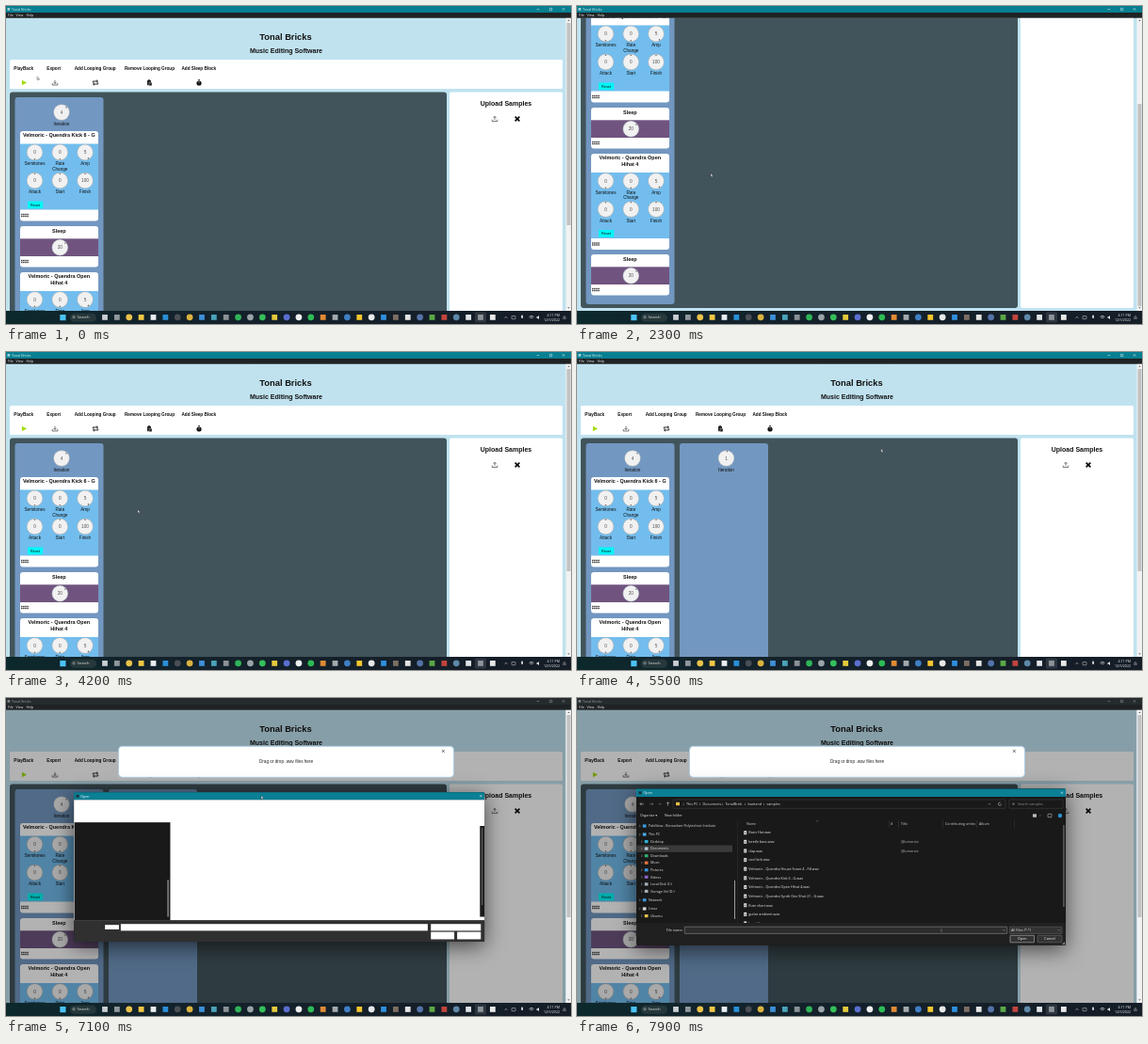
An HTML page with a canvas for the animation above (8 s loop, 600x338 px).

```html
<!DOCTYPE html>
<html lang="en">
<head>
<meta charset="utf-8">
<title>Tonal Bricks</title>
<style>
html, body { margin: 0; width: 100%; height: 100%; overflow: hidden; background: #121b24; }
canvas { display: block; width: 100vw; height: 100vh; }
</style>
</head>
<body>
<canvas id="stage" width="600" height="338"></canvas>
<script>
const c = document.getElementById('stage').getContext('2d');
const LOOP = 8000;
const SANS = '"Liberation Sans", Arial, sans-serif';
const UI = '"Open Sans", "Noto Sans", sans-serif';
const BASE = 4.67, H3 = 5.46, H2 = 7, H1 = 9.33;
const PAGE_END = 447;

const CURSOR = [
  [0, 33, 75], [250, 22, 86], [800, 60, 150], [1300, 62, 245], [1850, 142, 178],
  [2950, 142, 178], [3100, 145, 178], [3900, 145, 178], [4200, 140, 168],
  [4800, 95, 82], [5150, 95, 82], [5800, 517, 121], [6000, 518, 122],
  [6150, 518, 122], [6300, 448, 122], [6650, 300, 70], [6950, 285, 80],
  [7100, 271, 104], [7300, 271, 104], [7700, 387, 247]
];
const SCROLL = [[1900, 0], [2230, 126], [3400, 126], [3600, 103], [4050, 0]];
const GROUP_AT = 5100, MODAL_AT = 6200, DIALOG_AT = 7000, LOADED_AT = 7300;

function track(keys, t, i = 1) {
  if (t <= keys[0][0]) return keys[0][i];
  for (let k = 1; k < keys.length; k++) {
    const a = keys[k - 1], b = keys[k];
    if (t <= b[0]) return a[i] + (b[i] - a[i]) * (t - a[0]) / (b[0] - a[0]);
  }
  return keys[keys.length - 1][i];
}

function rect(x, y, x2, y2, fill) {
  c.fillStyle = fill;
  c.fillRect(x, y, x2 - x, y2 - y);
}

function round(x, y, x2, y2, r, fill, stroke, w = 0.5) {
  c.beginPath();
  c.roundRect(x, y, x2 - x, y2 - y, r);
  if (fill) { c.fillStyle = fill; c.fill(); }
  if (stroke) { c.strokeStyle = stroke; c.lineWidth = w; c.stroke(); }
}

function disc(x, y, r, fill) {
  c.beginPath();
  c.arc(x, y, r, 0, 7);
  c.fillStyle = fill;
  c.fill();
}

// y is the vertical middle of the line
function text(s, x, y, { size = BASE, bold = false, color = '#111', align = 'center', font = SANS } = {}) {
  c.font = `${bold ? 'bold ' : ''}${size}px ${font}`;
  c.textAlign = align;
  c.textBaseline = 'alphabetic';
  c.fillStyle = color;
  c.fillText(s, x, y + size * 0.35);
}

const label = (s, x, y, size = 3.7, color = '#e4e4e4', align = 'left') =>
  text(s, x, y, { size, color, align, font: UI });

function path(d, x, y, { stroke, fill, w = 0.7, scale = 1 }) {
  const p = new Path2D(d);
  c.save();
  c.translate(x, y);
  c.scale(scale, scale);
  if (fill) { c.fillStyle = fill; c.fill(p); }
  if (stroke) { c.strokeStyle = stroke; c.lineWidth = w; c.stroke(p); }
  c.restore();
}

const CROSS = 'M-1 -1L1 1M1 -1L-1 1';
const cross = (x, y, r, color, w) => path(CROSS, x, y, { stroke: color, w: w / r, scale: r });
const chevron = (x, y, color = '#aaa') => path('M-.6 -1.1L.6 0L-.6 1.1', x, y, { stroke: color, w: 0.5 });

function knob(x, y, value, turn) {
  disc(x, y, 8.7, '#a9b4bb');
  disc(x, y, 8.1, '#f1f1f1');
  const a = turn * Math.PI * 2;
  disc(x + Math.sin(a) * 7.3, y - Math.cos(a) * 7.3, 0.8, '#6b6b6b');
  text(value, x, y, { color: '#4d4d4d' });
}

function handle(y) {
  for (let i = 0; i < 4; i++)
    for (let j = -1; j < 2; j += 2) rect(16 + i * 2.1, y + j - 0.7, 17.5 + i * 2.1, y + j + 0.7, '#3a3a3a');
}

function sampleCard(top, lines) {
  const b = top + 7 + lines.length * 6.5;
  round(15, top, 98, b + 82, 3, '#fff');
  lines.forEach((s, i) => text(s, 56.3, top + 4.3 + i * 6.6, { size: H3, bold: true }));
  rect(15, b, 98, b + 70, '#72bdee');
  [['Semitones', 30.5, 0, .5], ['Rate', 57.3, 0, .5], ['Amp', 84, 5, .42]].forEach(([s, x, v, a]) => {
    knob(x, b + 9, v, a);
    text(s, x, b + 21.3);
  });
  text('Change', 57.3, b + 26.7);
  [['Attack', 30.5, 0], ['Start', 57.3, 0], ['Finish', 84, 100]].forEach(([s, x, v]) => {
    knob(x, b + 39, v, 0);
    text(s, x, b + 51.3);
  });
  round(23, b + 61, 39.2, b + 68.8, 0.8, '#00f7f7');
  text('Reset', 31, b + 65, { size: 3.9 });
  handle(b + 76);
}

function sleepCard(top) {
  round(15, top, 98, top + 43.5, 3, '#fff');
  text('Sleep', 56.3, top + 4.6, { size: H3, bold: true });
  rect(15, top + 13.3, 98, top + 32, '#70547f');
  knob(57.3, top + 22.7, 20, 0.14);
  handle(top + 37.5);
}

function group(x, count, turn) {
  round(x, 97, x + 94, 443, 3, '#7297c1');
  knob(x + 49.5, 113, count, turn);
  text('Iteration', x + 49.5, 125);
}

function toolIcons(y) {
  path('M-2.4 -2.8L2.8 0L-2.4 2.8Z', 19.3, y, { fill: '#a3dc12' });
  path('M-2.8 .6V2.5H2.8V.6M0 -2.8V1M-1.5 -.5L0 1L1.5 -.5', 52, y, { stroke: '#222', w: 0.6 });
  path('M-2.7 0V-1.5H2M1 -2.8L2.6 -1.5L1 -.2M2.7 0V1.5H-2M-1 .2L-2.6 1.5L-1 2.8', 95, y, { stroke: '#111', w: 0.9 });
  round(150, y - 2.5, 154, y + 2.7, 0.5, '#222');
  rect(151, y - 3.2, 153, y - 2, '#222');
  round(152, y - 0.2, 155, y + 3.2, 0.4, '#222', '#fff', 0.4);
  disc(205, y + 0.5, 2.6, '#111');
  rect(204, y - 3.2, 206, y - 2.4, '#111');
  path('M0 -1.2V.7', 205, y, { stroke: '#fff', w: 0.5 });
}

function page(scroll, t) {
  c.save();
  c.beginPath();
  c.rect(0, 12.5, 600, 311.5);
  c.clip();
  rect(0, 12, 600, 324, '#c0e2ef');
  c.translate(0, -scroll);

  text('Tonal Bricks', 297, 33, { size: H1, bold: true });
  text('Music Editing Software', 297.5, 47.5, { size: H2, bold: true });
  round(4, 57, 591, 88, 1.5, '#fff');
  [['PlayBack', 18.7], ['Export', 50.7], ['Add Looping Group', 94.7],
   ['Remove Looping Group', 152.5], ['Add Sleep Block', 204.8]]
    .forEach(([s, x]) => text(s, x, 66.3, { bold: true }));
  toolIcons(81.5);

  round(4, 91.5, 468, PAGE_END, 3, '#42545b');
  group(9.5, 4, 0.12);
  sampleCard(133, ['Velmoric - Quendra Kick 6 - G']);
  sleepCard(234);
  sampleCard(283, ['Velmoric - Quendra Open', 'Hihat 4']);
  sleepCard(390);
  if (t >= GROUP_AT) group(109, 1, 0.02);

  round(471, 91.5, 591, PAGE_END, 2, '#fff');
  text('Upload Samples', 531, 104, { size: H2, bold: true });
  path('M-2.8 .6V2.5H2.8V.6M0 1V-2.7M-1.5 -1.2L0 -2.7L1.5 -1.2', 519, 120, { stroke: '#222', w: 0.6 });
  cross(543, 120, 2.4, '#000', 1.5);
  c.restore();

  if (t >= MODAL_AT) modal();
  scrollbar(scroll);
}

function modal() {
  rect(0, 12.5, 594.5, 324, 'rgba(0,0,0,.3)');
  round(119.5, 51.3, 475.5, 84.3, 4, '#fff', '#a9cbe6', 0.9);
  text('Drag or drop .wav files here', 297.5, 67.8, { color: '#222' });
  cross(464.3, 56.5, 1.3, '#222', 0.7);
}

function scrollbar(scroll) {
  rect(594.5, 12.5, 600, 324, '#f2f2f2');
  const y = 18 + scroll * 0.683;
  rect(595.5, y, 599.5, y + 215, '#c2c2c2');
  path('M-1.2 .7L0 -.7L1.2 .7Z', 597.5, 15.3, { fill: '#666' });
  path('M-1.2 -.7L0 .7L1.2 -.7Z', 597.5, 321, { fill: '#666' });
}

function titleBar(active) {
  rect(0, 0, 600, 7, active ? '#087f92' : '#262b2e');
  rect(0, 7, 600, 12.6, '#1f2224');
  const ink = active ? '#e8f4f6' : '#9a9fa2';
  rect(1.5, 2, 4.2, 4.8, active ? '#9fd0d8' : '#7d8487');
  label('Tonal Bricks', 6, 3.5, 3.7, ink);
  [['File', 2], ['View', 10.5], ['Help', 21.5]].forEach(([s, x]) => label(s, x, 9.8, 3.6, '#f0f0f0'));
  path('M-1.3 0H1.3', 565, 3.5, { stroke: ink, w: 0.5 });
  round(577.5, 2.3, 579.8, 4.6, 0, null, ink);
  cross(592, 3.4, 1.2, ink, 0.5);
}

// a leading "o" makes the icon round
const APPS = ('c9ced2 8f979c oe9c24a f2c744 e9eef2 2a8fd8 o4a4f55 od9b23f 3d8fd6 4aa3b8 8a9196 o2fb457 ' +
  'o9aa3a8 o35c05a e5c93c o5a6fd0 oeef0f0 o2dbb55 e08a34 a3a9ad o3f7fc4 f3c62f oe8e8e8 2f8fdc ' +
  '7d6d62 e4e4e4 o5573a8 5aa845 c2453d o5e88a8 dfe3e6 8d9499 e9e9e9').split(' ');

function taskbar() {
  const g = c.createLinearGradient(0, 0, 600, 0);
  g.addColorStop(0, '#0c292c');
  g.addColorStop(0.25, '#13222b');
  g.addColorStop(1, '#151d27');
  c.fillStyle = g;
  c.fillRect(0, 324, 600, 14);
  rect(57.3, 328, 63.5, 334.2, '#4cc2f5');
  round(68, 326.7, 96, 335.7, 4.5, '#26383b');
  c.beginPath();
  c.arc(72, 330.7, 1.2, 0, 7);
  c.strokeStyle = '#ddd';
  c.lineWidth = 0.5;
  c.stroke();
  label('Search', 75.5, 331, 4.2);
  round(498, 325.5, 510, 336.5, 1.5, '#2e3740');
  APPS.forEach((a, i) => {
    const x = 105 + i * 12.87, round = a[0] === 'o', color = '#' + a.slice(-6);
    if (round) disc(x, 330.8, 3.4, color);
    else rect(x - 2.9, 328, x + 2.9, 333.8, color);
  });
  path('M-1.4 .7L0 -.7L1.4 .7', 531, 331, { stroke: '#ddd', w: 0.6 });
  round(537, 329.5, 541, 332.7, 0.4, null, '#ddd');
  round(547.2, 328.5, 549, 332, 0.8, '#ddd');
  path('M-2.4 -.6Q0 -2.7 2.4 -.6M-1.3 .7Q0 -.5 1.3 .7', 558, 331, { stroke: '#eee', w: 0.7 });
  path('M-1.5 -.8H-.4L1 -2V2L-.4 .8H-1.5Z', 565, 331, { fill: '#eee' });
  label('4:11 PM', 588, 328.8, 3.6, '#eee', 'right');
  label('12/5/2022', 588, 334, 3.6, '#eee', 'right');
  path('M-1.5 1.2H1.5L1 .4V-.6Q0 -2.4 -1 -.6V.4Z', 593, 331, { stroke: '#ddd', w: 0.5 });
}

const PLACES = [
  ['PaleStow - Rensselaer Polytechnic Institute', 136, 0, '#3c9be0'], ['This PC', 145, 0, '#48a9e6'],
  ['Desktop', 152.6, 1, '#2fb0d8'], ['Documents', 160.1, 1, '#b9c6d0'], ['Downloads', 167.7, 1, '#35b06e'],
  ['Music', 175.2, 1, '#e2763e'], ['Pictures', 182.8, 1, '#3f94dd'], ['Videos', 190.3, 1, '#8b62c9'],
  ['Local Disk (C:)', 197.9, 1, '#a7b0b6'], ['Storage Vol (D:)', 205.4, 1, '#a7b0b6'],
  ['Network', 214.7, 0, '#3f94dd'], ['Linux', 224, 0, '#d8d8d8'], ['Ubuntu', 231.6, 1, '#e5bd4a']
];
const PACK = 'Velmoric - Quendra ';
const FILES = ['Basic Hat', 'beetle bass', 'clap', 'cool kick', PACK + 'House Snare 4 - F#', PACK + 'Kick 6 - G',
  PACK + 'Open Hihat 4', PACK + 'Synth One Shot 21 - G', 'flute short', 'guitar ambient', 'hey title'];

function dialogFrame() {
  c.save();
  c.shadowColor = 'rgba(0,0,0,.6)';
  c.shadowBlur = 22;
  c.shadowOffsetY = 5;
  round(63, 96.3, 519, 262.7, 1.5, '#191919');
  c.restore();
  rect(63, 96.5, 519, 105, '#0b7f94');
  rect(65.5, 99.3, 68.5, 102.3, '#1d3238');
  label('Open', 70.5, 100.8, 3.7, '#fff');
  cross(515, 100.7, 1.1, '#fff', 0.5);
}

function dialogBlank() {
  rect(63, 105, 519, 239, '#fff');
  rect(63.5, 130, 170, 239, '#191919');
  rect(514, 134, 519, 235, '#191919');
  rect(516.2, 136, 517, 222, '#8b8b8b');
  rect(167, 194, 168, 235, '#c8c8c8');
  rect(63, 239, 519, 262.7, '#303030');
  [[97.5, 244, 113, 249], [115, 243, 456, 250.5], [459.5, 243, 515, 250.5],
   [459.5, 251.8, 485.5, 260], [488.7, 251.8, 515, 260]].forEach(b => rect(...b, '#fff'));
}

function dialogContent() {
  path('M2 0H-2M-.4 -1.6L-2 0L-.4 1.6', 69, 112.7, { stroke: '#ddd', w: 0.5 });
  path('M-2 0H2M.4 -1.6L2 0L.4 1.6', 79, 112.7, { stroke: '#888', w: 0.5 });
  path('M-1.2 -.6L0 .6L1.2 -.6', 88, 112.7, { stroke: '#bbb', w: 0.5 });
  path('M0 2V-2M-1.6 -.4L0 -2L1.6 -.4', 96.5, 112.7, { stroke: '#ddd', w: 0.5 });
  round(102, 108, 455, 117.3, 0.5, null, '#444');
  rect(105, 110.8, 109, 114.2, '#e5bd4a');
  [['This PC', 116], ['Documents', 133.5], ['TonalBrick', 157.5], ['backend', 181.5], ['samples', 201.5]]
    .forEach(([s, x]) => { chevron(x - 3, 112.9); label(s, x, 112.7); });
  path('M-1.2 -.6L0 .6L1.2 -.6', 438, 112.7, { stroke: '#bbb', w: 0.5 });
  c.beginPath();
  c.arc(449, 112.7, 1.6, 0, 5.2);
  c.strokeStyle = '#ddd';
  c.lineWidth = 0.5;
  c.stroke();
  round(459, 108, 516, 117.3, 0.5, null, '#444');
  label('Search samples', 468, 112.7, 3.7, '#8f8f8f');
  disc(463.5, 112.7, 1.1, '#777');

  label('Organize ▾', 67, 125);
  label('New folder', 93, 125);
  rect(484, 123.3, 488, 126.7, '#bbb');
  path('M-.8 -.4L0 .4L.8 -.4', 492, 125, { stroke: '#bbb', w: 0.4 });
  round(500, 123.3, 504, 126.7, 0.3, null, '#ddd');
  disc(513, 125, 2.2, '#2b93cf');

  rect(63.5, 156.5, 165, 163.8, '#3a3a3a');
  PLACES.forEach(([s, y, deep, color]) => {
    const x = deep ? 78 : 76;
    chevron(x - 9.3, y);
    rect(x - 6.2, y - 1.6, x - 2.5, y + 1.6, color);
    label(s, x, y, 3.6);
  });
  rect(167, 194, 168, 235, '#9d9d9d');
  rect(170, 130, 170.5, 239, '#303030');

  [['Name', 180], ['#', 333], ['Title', 344], ['Contributing artists', 391], ['Album', 427]]
    .forEach(([s, x]) => label(s, x, 133.5, 3.6, '#d0d0d0'));
  [331, 341.5, 388.5, 424.5, 464].forEach(x => rect(x, 130, x + 0.4, 138, '#444'));
  path('M-1.2 .5L0 -.5L1.2 .5', 255, 130.8, { stroke: '#aaa', w: 0.4 });
  c.save();
  c.beginPath();
  c.rect(171, 138, 345, 101);
  c.clip();
  FILES.forEach((s, i) => {
    const y = 143.2 + i * 9.63;
    rect(177.2, y - 2, 180.2, y + 2, '#e4e4e4');
    rect(178, y - 0.6, 179.4, y + 1, '#777');
    label(s + '.wav', 182.3, y, 3.7, '#ededed');
    if (i === 1 || i === 2) label('@lumorvia', 344, y, 3.7, '#bbb');
  });
  c.restore();
  rect(516.5, 135, 517.4, 222, '#8b8b8b');

  rect(63, 239, 519, 262.5, '#202020');
  label('File name:', 112.5, 246.8, 3.7, '#e4e4e4', 'right');
  round(114.3, 243.2, 456.7, 250.4, 0.4, '#2d2d2d', '#9a9a9a');
  round(459.3, 243.2, 515, 250.4, 0.4, '#333', '#666');
  label('All Files (*.*)', 461, 246.8);
  [453.5, 512].forEach(x => path('M-1 -.5L0 .5L1 -.5', x, 246.8, { stroke: '#ccc', w: 0.4 }));
  round(460, 252.3, 485.5, 259.8, 0.5, '#333', '#d5d5d5');
  round(489, 252.3, 515, 259.8, 0.5, '#333', '#777');
  label('Open', 472.8, 256, 3.7, '#fff', 'center');
  label('Cancel', 502, 256, 3.7, '#fff', 'center');
  path('M0 0V-3L-3 0Z', 518, 262, { fill: '#8a8a8a' });
}

function dialog(t) {
  const p = Math.min(1, (t - DIALOG_AT) / 230);
  const s = 1 - 0.14 * (1 - p) ** 2;
  c.save();
  c.globalAlpha = Math.min(1, 0.3 + p * 1.7);
  c.translate(291 - (1 - s) * 20, 179.5);
  c.scale(s, s);
  c.translate(-291, -179.5);
  dialogFrame();
  if (t < LOADED_AT) dialogBlank();
  else dialogContent();
  c.restore();
}

function pointer(t) {
  const x = track(CURSOR, t, 1), y = track(CURSOR, t, 2);
  if (t >= 7650) path('M0 -1.8V1.8', x, y, { stroke: '#ccc', w: 0.4 });
  else path('M0 0V3.4L.9 2.6L1.5 3.9L2.1 3.6L1.5 2.4H2.6Z', x, y, { fill: '#fff', stroke: '#222', w: 0.35 });
}

function draw(t) {
  page(track(SCROLL, t), t);
  titleBar(t < DIALOG_AT);
  taskbar();
  if (t >= DIALOG_AT) dialog(t);
  pointer(t);
}

const start = performance.now();
function tick() {
  draw((performance.now() - start) % LOOP);
  requestAnimationFrame(tick);
}
tick();
</script>
</body>
</html>
```
